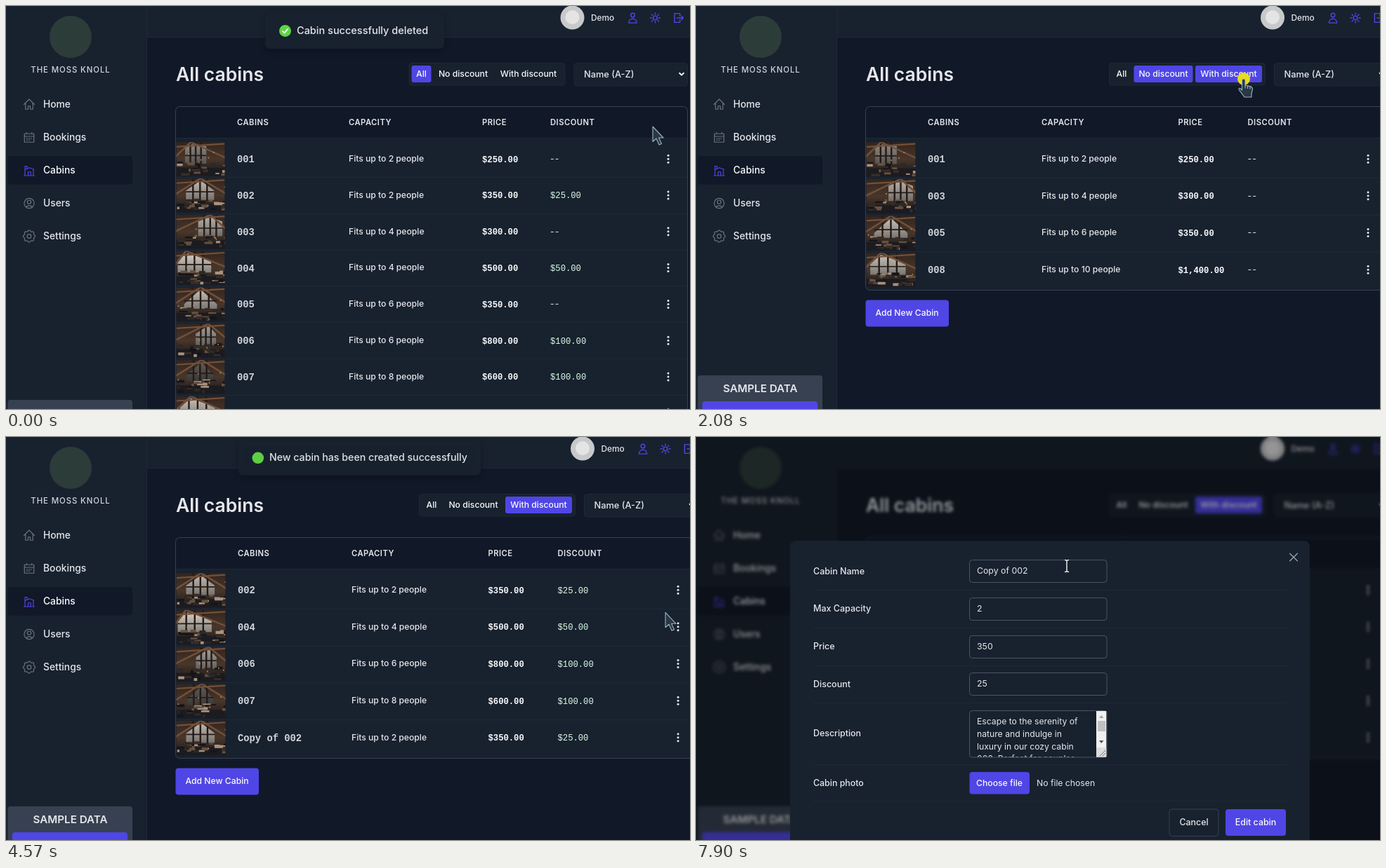
An HTML page with a canvas for the animation above (8 s loop, 974 px wide and 575 px high).

```html
<!DOCTYPE html>
<html lang="en">
<head>
<meta charset="utf-8">
<title>Cabins</title>
<style>
html, body { margin: 0; width: 100%; height: 100%; overflow: hidden; background: #111827; }
canvas { display: block; }
</style>
</head>
<body>
<canvas id="stage" width="974" height="575"></canvas>
<script>
const W = 974, H = 575, LOOP = 8000;
const screen = document.getElementById('stage').getContext('2d');
const buffer = document.createElement('canvas');
buffer.width = W;
buffer.height = H;
let c = screen;

const BG = '#111827', PANEL = '#18212e', LINE = '#1f2937', EDGE = '#374151';
const MUTED = '#6b7280', SOFT = '#d1d5db', TEXT = '#e5e7eb', BRIGHT = '#f9fafb', BRAND = '#4f46e5';
const SANS = 'Inter, "Open Sans", sans-serif';
const MONO = '"Liberation Mono", "DejaVu Sans Mono", monospace';

const SWITCH_TO_NONE = 620, SWITCH_TO_DISCOUNT = 2150, COPY_ADDED = 4435, MODAL_OPEN = 7230;
const CLICKS = [560, 2080, 3630, 4200, 5690, 7030];

// name, guests, price, discount, photo
const CABINS = [
  ['001', 2, '$250.00', '--', 0],
  ['002', 2, '$350.00', '$25.00', 1],
  ['003', 4, '$300.00', '--', 2],
  ['004', 4, '$500.00', '$50.00', 3],
  ['005', 6, '$350.00', '--', 4],
  ['006', 6, '$800.00', '$100.00', 5],
  ['007', 8, '$600.00', '$100.00', 6],
  ['008', 10, '$1,400.00', '--', 7]
];
const COPY = ['Copy of 002', 2, '$350.00', '$25.00', 1];

// window left, apex, right, shoulder height, brightness
const PHOTOS = [
  [.18, .3, .62, .12, .62], [.2, .5, .78, .36, .85], [.45, .7, .95, .2, .8], [.03, .2, .72, .28, .95],
  [.16, .5, .84, .5, .88], [.4, .66, .82, .3, .72], [.22, .52, .76, .45, .42], [.08, .3, .8, .32, .88]
];

// time, x, y of the pointer tip
const PATH = [
  [0, 921, 172], [70, 921, 172], [400, 700, 115], [500, 666, 99], [690, 666, 99], [830, 712, 103],
  [960, 744, 104], [1250, 768, 101], [1660, 780, 104], [2780, 780, 104], [2950, 832, 97],
  [3190, 962, 208], [3280, 952, 243], [3540, 952, 243], [3620, 957, 219], [3770, 957, 219],
  [4000, 922, 250], [4400, 922, 252], [4570, 939, 250], [4900, 950, 340], [5190, 961, 424],
  [5240, 961, 424], [5530, 965, 437], [5900, 965, 437], [6350, 936, 462], [6470, 936, 462],
  [6830, 911, 497], [7200, 911, 497], [7830, 525, 223], [7900, 528, 184]
];

const clamp = v => Math.max(0, Math.min(1, v));
const ramp = (t, start, length) => clamp((t - start) / length);
const within = (t, a, b) => t >= a && t < b;

function rect(x, y, w, h, r, fill, stroke) {
  c.beginPath();
  c.roundRect(x, y, w, h, r);
  if (fill) { c.fillStyle = fill; c.fill(); }
  if (stroke) { c.strokeStyle = stroke; c.lineWidth = 1; c.stroke(); }
}

function circle(x, y, r, fill) {
  c.beginPath();
  c.arc(x, y, r, 0, 7);
  c.fillStyle = fill;
  c.fill();
}

function text(str, x, y, size, color = TEXT, weight = 500, { align = 'left', spacing = 0, font = SANS } = {}) {
  c.font = `${weight} ${size}px ${font}`;
  c.fillStyle = color;
  c.textAlign = align;
  c.textBaseline = 'alphabetic';
  c.letterSpacing = spacing + 'px';
  c.fillText(str, x, y + size * .36);
}

function hline(x1, x2, y, color) {
  c.fillStyle = color;
  c.fillRect(x1, y, x2 - x1, 1);
}

// Outline icons on a 24 unit grid
const ICONS = {
  home: 'M2 12 12 2 22 12M5 9.500V21h5v-6h4v6h5V9.500',
  calendar: 'M3 5h18v16H3ZM3 10h18M7 2.500V5M17 2.500V5M7 14h2M11 14h2M15 14h2M7 17h2M11 17h2',
  cabin: 'M2 22h20M4 22V4M4 11l8-4 9 3M4 4h4v5M20 10v12M10 22v-7h5v7',
  users: 'M21.500 12a9.500 9.500 0 1 1-19 0a9.500 9.500 0 1 1 19 0ZM15.500 9.500a3.500 3.500 0 1 1-7 0a3.500 3.500 0 1 1 7 0ZM6 19a7 5 0 0 1 12 0',
  user: 'M16 6.500a4 4 0 1 1-8 0a4 4 0 1 1 8 0ZM4 22c0-11 16-11 16 0Z',
  sun: 'M16 12a4 4 0 1 1-8 0a4 4 0 1 1 8 0ZM12 2v3M12 19v3M2 12h3M19 12h3M5 5l2 2M17 17l2 2M5 19l2-2M17 7l2-2',
  exit: 'M15 8V3H4v18h11v-5M9 12h13M18 8l4 4-4 4',
  check: 'M6.500 12.500l4 4 7-8.500',
  close: 'M4 4 20 20M20 4 4 20',
  chevron: 'M5 9l7 7 7-7'
};

function icon(name, x, y, size, color, width = 1.5) {
  c.save();
  c.translate(x - size / 2, y - size / 2);
  c.scale(size / 24, size / 24);
  c.strokeStyle = color;
  c.lineWidth = width * 24 / size;
  c.lineCap = c.lineJoin = 'round';
  c.stroke(new Path2D(ICONS[name]));
  c.restore();
}

function gear(x, y, color) {
  c.beginPath();
  for (let i = 0; i <= 64; i++) {
    const a = i / 64 * Math.PI * 2, r = 7.2 + clamp(Math.cos(a * 8) * 2 + .5) * 1.3;
    c.lineTo(x + r * Math.cos(a), y + r * Math.sin(a));
  }
  c.moveTo(x + 2.8, y);
  c.arc(x, y, 2.8, 0, 7);
  c.strokeStyle = color;
  c.lineWidth = 1.2;
  c.stroke();
}

function poly(points, fill) {
  c.beginPath();
  points.forEach(p => c.lineTo(...p));
  c.closePath();
  c.fillStyle = fill;
  c.fill();
}

function photo(index, x, y, w, h) {
  const [left, apex, right, shoulder, light] = PHOTOS[index];
  let seed = index * 37 + 11;
  const rnd = () => (seed = seed * 16807 % 2147483647) / 2147483647;
  const grey = k => `rgb(${[235, 228, 220].map(v => v * k * light | 0)})`;
  c.save();
  c.beginPath();
  c.rect(x, y, w, h);
  c.clip();
  c.translate(x, y);
  c.scale(w, h);
  const wall = c.createLinearGradient(0, 0, 0, 1);
  wall.addColorStop(0, '#33251d');
  wall.addColorStop(.5, '#49362a');
  wall.addColorStop(1, '#171719');
  c.fillStyle = wall;
  c.fillRect(0, 0, 1, 1);
  const pane = c.createLinearGradient(0, 0, 0, .7);
  pane.addColorStop(0, grey(1));
  pane.addColorStop(1, grey(.55));
  poly([[left, .64], [left, shoulder], [apex, .06], [right, shoulder], [right, .64]], pane);
  c.strokeStyle = '#241a16';
  c.lineWidth = .035;
  c.beginPath();
  for (let i = 1; i < 4; i++) {
    const m = left + (right - left) * i / 4;
    c.moveTo(m, 0);
    c.lineTo(m, .66);
  }
  c.moveTo(left, .4);
  c.lineTo(right, .4);
  c.stroke();
  c.strokeStyle = '#71503a';
  c.lineWidth = .045;
  c.beginPath();
  c.moveTo(-.1, .55);
  c.lineTo(apex, 0);
  c.lineTo(1.1, .52);
  c.moveTo(0, .14);
  c.lineTo(1, .05);
  c.stroke();
  c.fillStyle = '#1b1b20';
  c.fillRect(0, .76, 1, .24);
  for (let i = 0; i < 26; i++) {
    c.fillStyle = ['#14151a', '#2b2826', '#66513f', '#a9927d', '#3a2d26'][rnd() * 5 | 0];
    c.fillRect(rnd(), .57 + rnd() * .36, .04 + rnd() * .14, .03 + rnd() * .06);
  }
  for (let i = 0; i < 4; i++) {
    c.fillStyle = '#c58a50';
    c.fillRect(rnd(), .2 + rnd() * .5, .025, .035);
  }
  c.restore();
}

function sidebar(wide) {
  c.fillStyle = PANEL;
  c.fillRect(0, 0, 200, H);
  c.fillStyle = LINE;
  c.fillRect(200, 0, 1, H);
  circle(92, 44, 30, '#2c3c39');
  text('THE MOSS KNOLL', 92, 91, 11.4, SOFT, 500, { align: 'center', spacing: .9 });
  rect(2.5, 214, 177.5, 40.5, 4, BG);
  [['Home', 'home'], ['Bookings', 'calendar'], ['Cabins', 'cabin'], ['Users', 'users'], ['Settings']]
    .forEach(([label, name], i) => {
      const y = 140 + i * 47, active = i === 2, color = active ? BRAND : MUTED;
      if (name) icon(name, 33, y + .5, 18, color, 1.2);
      else gear(33, y + .5, color);
      text(label, 53, y, 13.8, active ? BRIGHT : TEXT);
    });
  const y = wide ? 527 : 562;
  rect(2.5, y, 177.5, 90, 4, EDGE);
  text('SAMPLE DATA', 91.5, y + 18.5, 15.2, TEXT, 600, { align: 'center' });
  rect(9, y + 37, 164, 40, 4, BRAND);
}

function header(dx) {
  c.fillStyle = PANEL;
  c.fillRect(201, 0, W, 44);
  hline(201, W, 44, LINE);
  circle(806.5 + dx, 16.5, 17, '#c8c9ca');
  circle(806.5 + dx, 16, 10, '#e4e4e5');
  text('Demo', 833 + dx, 17, 11.8, TEXT);
  icon('user', 892.5 + dx, 17, 17, BRAND, 1.4);
  icon('sun', 924.5 + dx, 17, 17, BRAND, 1.4);
  icon('exit', 957.5 + dx, 17, 17, BRAND, 1.4);
}

function filters(t, dx) {
  text('All cabins', 242, 97, 26.5, TEXT, 600);
  rect(574 + dx, 81.5, 222, 31.5, 4, PANEL, LINE);
  const levels = [
    1 - ramp(t, 600, 300),
    Math.min(ramp(t, 450, 300), 1 - ramp(t, 2100, 300)),
    ramp(t, 830, 300)
  ];
  [['All', 577.5, 28], ['No discount', 609, 84], ['With discount', 696.5, 95]].forEach(([label, x, w], i) => {
    c.globalAlpha = levels[i];
    rect(x + dx, 85, w, 24, 3, BRAND);
    c.globalAlpha = 1;
    text(label, x + w / 2 + dx, 97, 12.2, BRIGHT, 500, { align: 'center' });
  });
  rect(809 + dx, 81.5, 161.5, 32.5, 4, PANEL, LINE);
  text('Name (A-Z)', 823 + dx, 97.5, 12.8, TEXT);
  icon('chevron', 962 + dx, 97, 10, BRIGHT, 1.8);
}

function visibleRows(t) {
  if (t < SWITCH_TO_NONE) return CABINS;
  if (t < SWITCH_TO_DISCOUNT) return CABINS.filter(row => row[3] === '--');
  const rows = CABINS.filter(row => row[3] !== '--');
  return t < COPY_ADDED ? rows : [...rows, COPY];
}

function table(t, wide) {
  const rows = visibleRows(t), pitch = wide ? 52.65 : 51.8;
  const cols = wide ? [330, 492, 686.5, 785.5, 957] : [329, 488, 678, 775, 943];
  const right = wide ? 984.5 : 970.5;
  const bottom = Math.round(192.2 + rows.length * pitch + 2.5) + .5;
  rect(241.5, 143.5, right - 241.5, bottom - 143.5, 6, PANEL);
  rect(242, 144, right - 242.5, 44, [6, 6, 0, 0], BG);
  hline(242, right, 188, LINE);
  ['CABINS', 'CAPACITY', 'PRICE', 'DISCOUNT'].forEach((label, i) =>
    text(label, cols[i], 166, 11.2, TEXT, 600, { spacing: .5 }));
  rows.forEach(([name, guests, price, discount, picture], i) => {
    const top = 192.2 + i * pitch, y = top + 26;
    if (i) hline(242, right, Math.round(top), LINE);
    photo(picture, 242.5, top + 2, wide ? 70 : 69, wide ? 49 : 48);
    text(name, cols[0], y, 13.8, SOFT, 700, { font: MONO });
    text(`Fits up to ${guests} people`, cols[1], y - .5, 12.15, TEXT, 500);
    text(price, cols[2], y, 12.2, BRIGHT, 700, { font: MONO });
    if (discount === '--') text(discount, cols[3], y - .5, 12.2, SOFT, 500, { spacing: 1 });
    else text(discount, cols[3], y, 12.2, '#dcfce7', 400, { font: MONO });
    const focused = within(t, 3630, 3700) && i === 0 || within(t, 5670, 5870) && i === 4;
    if (focused) rect(cols[4] - 13.5, y - 14, 28, 28.5, 4, BG, TEXT);
    for (let k = -1; k < 2; k++) circle(cols[4], y + k * 5, 1.5, TEXT);
  });
  rect(241.5, 143.5, right - 241.5, bottom - 143.5, 6, null, EDGE);
  if (wide) {
    rect(241.5, bottom + 14, 118.5, 38, 4, BRAND);
    text('Add New Cabin', 300.5, bottom + 32.5, 12.2, BRIGHT, 500, { align: 'center' });
  }
}

function menuIcon(i, x, y) {
  c.fillStyle = MUTED;
  if (i === 0) {
    rect(x - 5, y - 5, 7.5, 7.5, 1, MUTED);
    rect(x - 2.5, y - 2.5, 8, 8, 1, MUTED, PANEL);
  } else if (i === 1) {
    poly([[x - 5.5, y + 5.5], [x - 4.5, y + 2.5], [x + 3, y - 5], [x + 5, y - 3], [x - 2.5, y + 4.5]], MUTED);
  } else {
    c.fillRect(x - 5, y - 4.5, 10, 1.5);
    c.fillRect(x - 2, y - 6, 4, 1.5);
    rect(x - 4, y - 2, 8, 8, 1, MUTED);
  }
}

function menu(t, pointer) {
  const first = within(t, 3700, 4305);
  if (!first && !within(t, 5870, MODAL_OPEN)) return;
  const top = first ? 238 : 449;
  const clicked = first && t > 4200 ? 0 : t > 7030 ? 1 : -1;
  c.save();
  c.shadowColor = 'rgba(0,0,0,.3)';
  c.shadowBlur = 20;
  c.shadowOffsetY = 5;
  rect(847, top, 124, 101, 5, PANEL);
  c.restore();
  ['Duplicate', 'Edit', 'Delete'].forEach((label, i) => {
    const y = top + 16.5 + i * 33.7, hover = pointer.x > 847 && Math.abs(pointer.y - y) < 16.8;
    if (hover || clicked === i) rect(847, y - 16.5, 124, 34, 0, BG);
    if (clicked === i) rect(846.5, y - 16.5, 125, 34, 0, null, '#7a74f0');
    menuIcon(i, 874, y);
    text(label, 894, y, 12.4, TEXT);
  });
}

function toast(label, centre, width, progress, alpha, scale, badge, tick) {
  c.save();
  c.globalAlpha = alpha;
  c.translate(centre, 35.5 - 102 * (1 - progress));
  c.scale(scale, scale);
  c.save();
  c.shadowColor = 'rgba(0,0,0,.25)';
  c.shadowBlur = 10;
  c.shadowOffsetY = 3;
  rect(-width / 2, -25.5, width, 51, 7, PANEL);
  c.restore();
  const left = -width / 2 + 28.5;
  if (badge) circle(left, 0, 8.5 * badge, '#61d345');
  if (tick) icon('check', left, 0, 16, '#fff', 1.8);
  text(label, left + 16.5, -.5, 14.5, TEXT);
  c.restore();
}

function toasts(t) {
  if (t < 730) {
    const leave = ramp(t, 330, 400) ** 2;
    toast('Cabin successfully deleted', t < SWITCH_TO_NONE ? 496.5 : 503.5, 255, 1 - leave, 1 - leave, 1 - .4 * leave, 1, true);
  }
  if (t >= COPY_ADDED) {
    const enter = 1 - (1 - ramp(t, 4363, 350)) ** 3.2;
    toast('New cabin has been created successfully', 503.5, 353, enter, .5 + .5 * enter, .6 + .4 * enter, ramp(t, 4440, 110), t > 4630);
  }
}

function modal() {
  rect(134, 148, 740, 500, 8, PANEL);
  icon('close', 851, 171.5, 16, '#9ca3af', 1.3);
  const fields = [['Cabin Name', 'Copy of 002'], ['Max Capacity', '2'], ['Price', '350'], ['Discount', '25']];
  fields.forEach(([label, value], i) => {
    const y = 191 + i * 53.8;
    text(label, 167, y, 12.5, TEXT);
    rect(389.5, Math.round(y - 16) + .5, 195.5, 32, 4, PANEL, '#4b5563');
    text(value, 400, y - .5, 12.3, TEXT, 400);
    hline(167, 840, Math.round(y + 27), LINE);
  });
  text('Description', 167, 423, 12.4, TEXT);
  rect(389.5, 390.5, 195.5, 66.5, 4, PANEL, '#4b5563');
  c.save();
  c.beginPath();
  c.rect(390, 391, 194.5, 65.5);
  c.clip();
  ['Escape to the serenity of', 'nature and indulge in', 'luxury in our cozy cabin', '002. Perfect for couples']
    .forEach((line, i) => text(line, 400, 406 + i * 17.6, 12.2, TEXT, 400));
  c.fillStyle = '#f1f1f1';
  c.fillRect(570, 391, 14.5, 66);
  c.fillStyle = '#c1c1c1';
  c.fillRect(572, 405, 11, 15);
  poly([[574, 401], [577.2, 397], [580.5, 401]], '#a3a3a3');
  poly([[574, 433], [577.2, 437], [580.5, 433]], '#505050');
  c.fillStyle = '#dcdcdc';
  c.fillRect(570, 443, 14.5, 14);
  c.strokeStyle = '#777';
  c.lineWidth = 1;
  c.beginPath();
  c.moveTo(575, 455); c.lineTo(583, 447);
  c.moveTo(579, 455); c.lineTo(583, 451);
  c.stroke();
  c.restore();
  hline(167, 840, 467, LINE);
  text('Cabin photo', 167, 493.5, 12.4, TEXT);
  rect(389.5, 478, 85.5, 31.5, 4, BRAND);
  text('Choose file', 432, 493.5, 12.2, BRIGHT, 500, { align: 'center' });
  text('No file chosen', 485, 493.5, 12.2, TEXT, 400);
  hline(167, 840, 519, LINE);
  rect(674, 531, 70, 38.5, 4, PANEL, EDGE);
  text('Cancel', 709, 550, 12.4, TEXT, 500, { align: 'center' });
  rect(754, 531, 86, 38, 4, BRAND);
  text('Edit cabin', 797, 550, 12.4, BRIGHT, 500, { align: 'center' });
}

function pointerAt(t) {
  let i = PATH.findIndex(key => key[0] > t);
  if (i < 0) i = PATH.length;
  const a = PATH[i - 1], b = PATH[i] || a;
  const k = a === b ? 0 : (t - a[0]) / (b[0] - a[0]);
  return { x: a[1] + (b[1] - a[1]) * k, y: a[2] + (b[2] - a[2]) * k };
}

const ARROW = new Path2D('M0 0V21.500L5 17l4 9 3.500-1.600-4-8.400H15Z');
const HAND = new Path2D('M-2.500 1.500Q0-1.500 2 1.500V9l8 1.800q2.500 1 2.500 4L11 21v5H1L-6.500 16q-1.500-3.500 1.500-2.500L-2.500 16ZM2 9v4.500M5.500 10v4M9 11v3.500');
const BEAM = new Path2D('M-3-8.500Q0-8.500 0-7V7Q0 8.500-3 8.500M3-8.500Q0-8.500 0-7M3 8.500Q0 8.500 0 7');

function drawPointer(t, { x, y }) {
  if (within(t, 2940, 3205)) return;
  const click = CLICKS.find(at => within(t, at, at + 180));
  if (click) {
    c.globalAlpha = 1 - .6 * ramp(t, click, 180);
    circle(x, y, 9, '#e8dc1e');
    c.globalAlpha = 1;
  }
  c.save();
  c.translate(x, y);
  c.lineJoin = 'round';
  if (t > 7750) {
    c.strokeStyle = '#e5e7eb';
    c.lineWidth = 1.5;
    c.stroke(BEAM);
  } else {
    const hand = within(t, 470, 2880) || within(t, 3600, 3800) || within(t, 5240, 5990);
    const shape = hand ? HAND : ARROW;
    c.fillStyle = '#293746';
    c.strokeStyle = '#9bb5c1';
    c.lineWidth = 1.1;
    c.fill(shape);
    c.stroke(shape);
  }
  c.restore();
}

function page(t, pointer) {
  const wide = t >= SWITCH_TO_NONE, dx = wide ? 14.5 : 0;
  c.fillStyle = BG;
  c.fillRect(0, 0, W, H);
  sidebar(wide);
  header(dx);
  filters(t, dx);
  table(t, wide);
  menu(t, pointer);
}

function frame(now) {
  const t = now % LOOP, pointer = pointerAt(t);
  c = screen;
  if (t < MODAL_OPEN) {
    page(t, pointer);
    toasts(t);
  } else {
    c = buffer.getContext('2d');
    page(t, pointer);
    c = screen;
    c.drawImage(buffer, 0, 0);
    c.filter = 'blur(2.3px)';
    c.drawImage(buffer, 0, 0);
    c.filter = 'none';
    c.fillStyle = 'rgba(0,0,0,.35)';
    c.fillRect(0, 0, W, H);
    modal();
  }
  drawPointer(t, pointer);
  requestAnimationFrame(frame);
}
requestAnimationFrame(frame);
</script>
</body>
</html>
```
